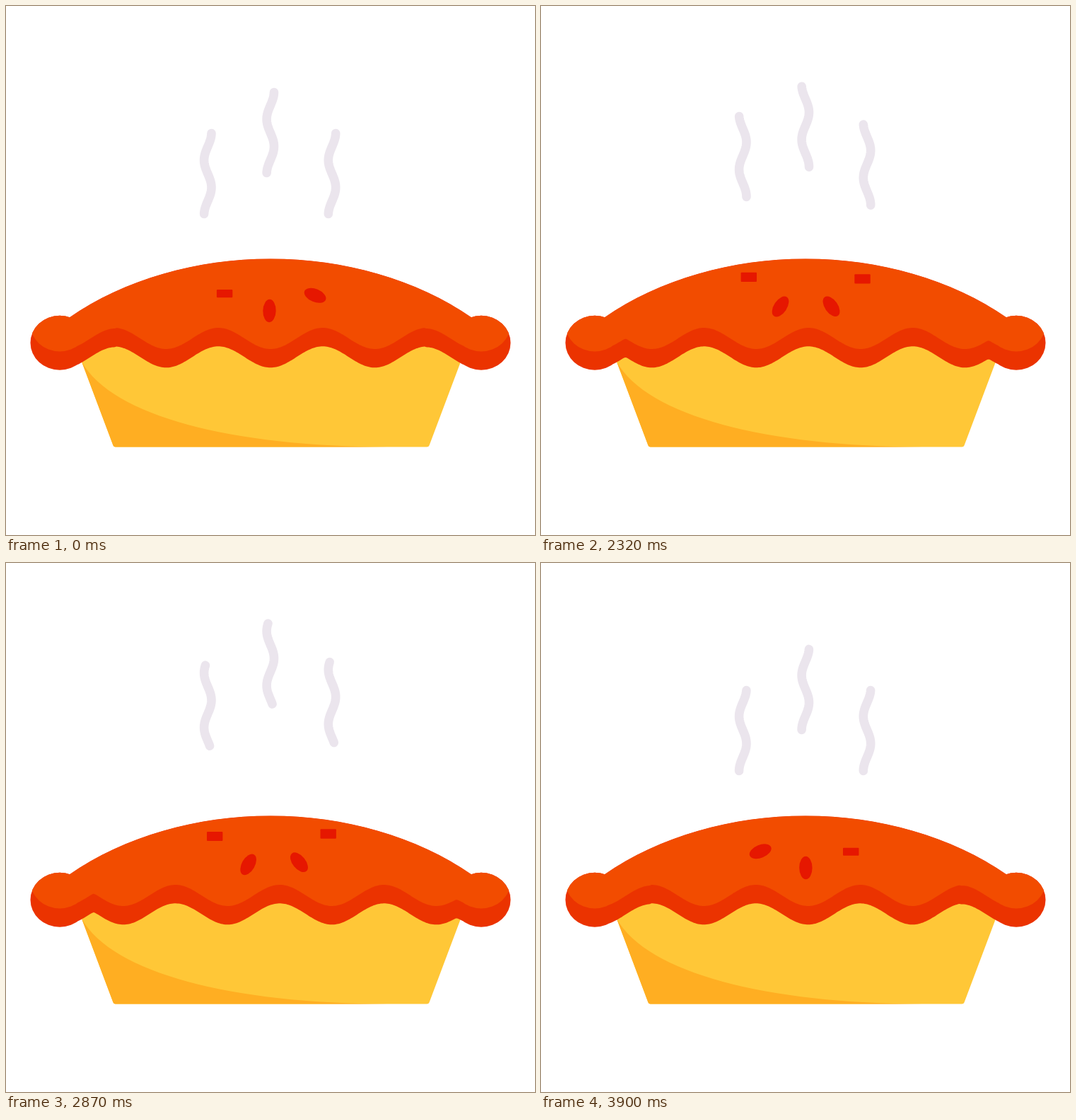
Write an HTML page with a canvas that moves like this. It is 748 px wide and 748 px high and loops after 3920 ms.

```html
<!DOCTYPE html>
<html lang="en">
<head>
<meta charset="utf-8">
<title>Hot pie</title>
<style>
  html, body { margin: 0; width: 100%; height: 100%; overflow: hidden; background: #fff; }
  canvas { display: block; width: 748px; height: 748px; }
</style>
</head>
<body>
<canvas id="stage" width="748" height="748"></canvas>
<script>
const ctx = document.getElementById('stage').getContext('2d');
const TAU = Math.PI * 2;
const LOOP = 3920, REST = 2020, STEP = 25, SPAN = 1925;
const WAVE = 147.5, TURNS = 5;      // crust wavelength, wavelengths per loop
const CURL = 77, CURLS = 3;         // steam wavelength, wavelengths per loop
const LEFT = 76, RIGHT = 672;

// Spin progress: time, value, slope per millisecond
const SPIN = [
  [0, 0, .0003], [25, .0142, .00084], [225, .332, .00152], [450, .658, .00083],
  [675, .79, .00045], [1100, .948, .0001], [1900, .995, .00003]
];

function spin(t) {
  let i = 0;
  while (i < SPIN.length - 2 && t > SPIN[i + 1][0]) i++;
  const [t0, v0, d0] = SPIN[i], [t1, v1, d1] = SPIN[i + 1];
  const h = t1 - t0, u = (t - t0) / h, w = 1 - u;
  return w * w * ((1 + 2 * u) * v0 + u * h * d0) + u * u * ((3 - 2 * u) * v1 - w * h * d1);
}

// Crust edge: a travelling wave that settles into a fixed trough at each end
const ripple = d => 470 + 15 * Math.cos(TAU * d / WAVE);
const softMax = (a, b) => (a + b + Math.hypot(a - b, 2)) / 2;

function edge(x, shift) {
  const inset = Math.max(0, Math.min(x - 82, 666 - x));
  const moving = ripple(x - 374 + shift);
  return inset < WAVE / 2 ? softMax(moving, ripple(inset)) : moving;
}

function crust(shift, drop) {
  const p = new Path2D();
  p.moveTo(LEFT, 450);
  p.lineTo(89, 441);
  p.bezierCurveTo(168, 386, 270, 357.5, 374, 357.5);
  p.bezierCurveTo(478, 357.5, 580, 386, 659, 441);
  p.lineTo(RIGHT, 450);
  for (let x = RIGHT; x >= LEFT; x -= 2) p.lineTo(x, edge(x, shift) + drop);
  p.closePath();
  for (const x of [LEFT, RIGHT]) {
    p.moveTo(x + 41.5, 450 + drop);
    p.ellipse(x, 450 + drop, 41.5, 38.5, 0, 0, TAU);
  }
  return p;
}

function fill(color, path) {
  ctx.fillStyle = color;
  ctx.fill(path);
}

function tin() {
  fill('#ffc737', new Path2D('M107 465V503L151 620Q152 623.5 155 623.5H595Q598 623.5 599 620L643 503V465Z'));
  fill('#ffae22', new Path2D('M107 503L151 620Q152 623.5 155 623.5H540C320 623 150 580 107 503Z'));
}

function seed(s) {
  if (Math.abs(s) >= 1.97) return;
  const a = s * Math.PI / 4;
  const x = 374 + 88 * Math.sin(a) + 2.5 * Math.sin(3 * a);
  const y = 431 - 50 * (1 - Math.cos(s)) + s ** 3 / 2;
  const p = new Path2D();
  if (s > -1 && s <= 1) {
    p.ellipse(x, y, 9.2, 16.2, -1.2 * s, 0, TAU);
  } else {
    const h = 11 + 4.5 * (Math.abs(s) - 1);
    p.roundRect(x - 11.2, y - h / 2, 22.4, h, 1);
  }
  fill('#e61700', p);
}

// Each plume rises until its own peak time, then sinks back
function steam(x, y, peak, t, progress) {
  const p = t < peak ? t / peak : 1 + (t - peak) / (SPAN - peak);
  const top = y - 20 * (1 - Math.cos(Math.PI * p));
  const phase = 38 + CURL * CURLS * progress;
  ctx.beginPath();
  for (let d = 0; d <= 114; d += 2)
    ctx.lineTo(x - 5.2 * Math.cos(TAU * (d - phase) / CURL), top + d);
  ctx.stroke();
}

function draw(now) {
  const time = now % LOOP;
  const t = time < REST ? 0 : (Math.floor((time - REST) / STEP) + 1) * STEP;
  const progress = spin(t), turn = TURNS * progress;

  ctx.clearRect(0, 0, 748, 748);
  ctx.lineWidth = 12.6;
  ctx.lineCap = ctx.lineJoin = 'round';
  ctx.strokeStyle = '#ebe5ed';
  steam(285.3, 180, 575, t, progress);
  steam(373.8, 122, 1080, t, progress);
  steam(461, 180, 865, t, progress);

  tin();
  const body = crust(turn * WAVE, 26.3);
  fill('#eb3300', body);
  ctx.save();
  ctx.clip(body);
  fill('#f24c00', crust(turn * WAVE, 0));
  for (let j = -2; j <= 3; j++) seed(j - turn % 1 - .02);
  ctx.restore();
}

const start = performance.now();
function tick() {
  draw(performance.now() - start);
  requestAnimationFrame(tick);
}
tick();
</script>
</body>
</html>
```
